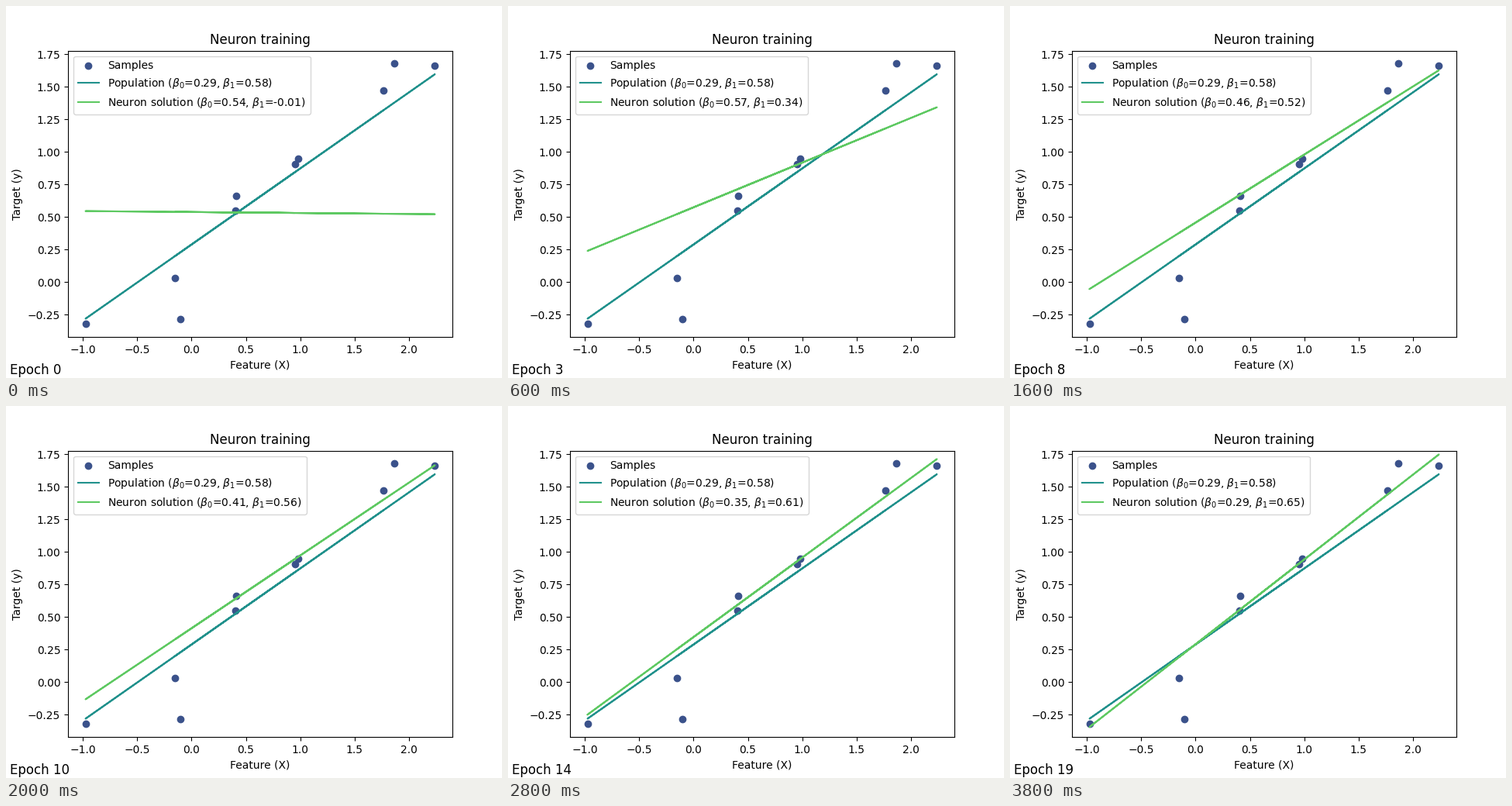
Write a matplotlib script that moves like this. It is 640 by 480 pixels and loops after 4000 ms.

```python
import matplotlib.pyplot as plt
import numpy as np
from matplotlib.animation import FuncAnimation

W, H, DPI = 640, 480, 100
EPOCHS = 20
RATE = 0.2

# Noisy samples around a random line
rng = np.random.RandomState(0)
x = rng.normal(size=10)
slope = rng.uniform(-1, 1)
bias = rng.uniform(-5, 5)
y = bias + slope * x + 0.2 * rng.normal(size=10)


def train(b0, b1):
    """Full-batch gradient descent; one (b0, b1) pair per epoch."""
    steps = []
    for _ in range(EPOCHS):
        steps.append((b0, b1))
        err = b0 + b1 * x - y
        b0, b1 = b0 - RATE * err.mean(), b1 - RATE * (err * x).mean()
    return steps


def label(name, b0, b1):
    return rf"{name} ($\beta_0$={b0:.2f}, $\beta_1$={b1:.2f})"


history = train(0.538, -0.0074)
blue, teal, green = (plt.cm.viridis(v) for v in (0.25, 0.5, 0.75))

fig, ax = plt.subplots(figsize=(W / DPI, H / DPI), dpi=DPI)
ax.scatter(x, y, color=blue, label="Samples")
ax.set_xlim(ax.get_xlim())
ax.set_ylim(ax.get_ylim())
ax.plot(x, bias + slope * x, color=teal, label=label("Population", bias, slope))
fit, = ax.plot(x, x, color=green, label=label("Neuron solution", *history[0]))
ax.set_title("Neuron training")
ax.set_xlabel("Feature (X)")
ax.set_ylabel("Target (y)")
fit_text = ax.legend(loc="upper left").get_texts()[-1]
epoch_text = fig.text(5 / W, 5 / H, "", fontsize=12)


def update(epoch):
    b0, b1 = history[epoch]
    fit.set_ydata(b0 + b1 * x)
    fit_text.set_text(label("Neuron solution", b0, b1))
    epoch_text.set_text(f"Epoch {epoch}")
    return fit, fit_text, epoch_text


anim = FuncAnimation(fig, update, frames=EPOCHS, interval=200, repeat=True)
plt.show()
```
